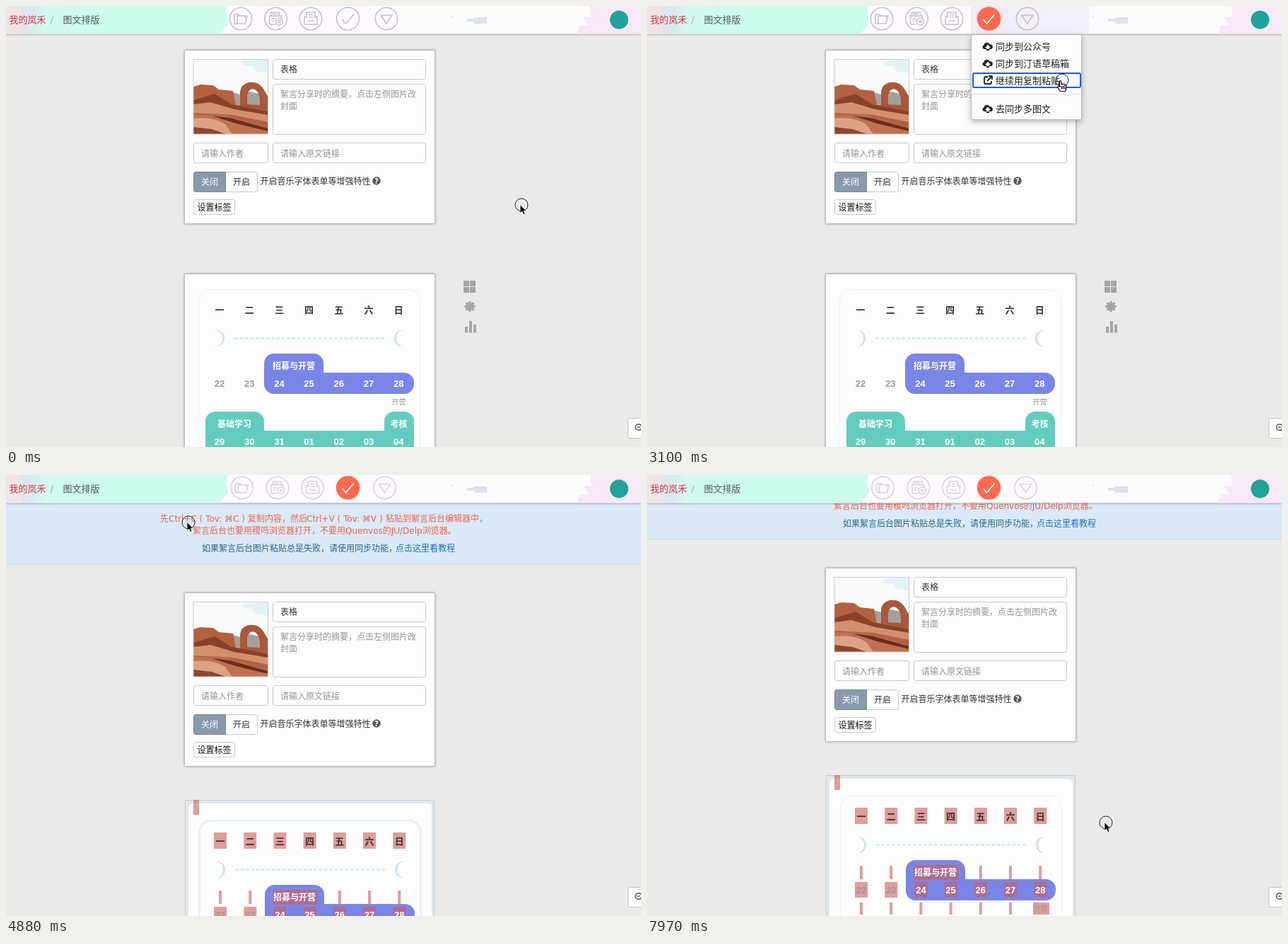
Recreate the animation shown at these times as an HTML page. Size 898 px wide and 623 px high, loop 8 s.

```html
<!DOCTYPE html>
<html lang="zh-CN">
<head>
<meta charset="utf-8">
<title>图文排版</title>
<style>
  html, body { margin: 0; width: 100%; height: 100%; overflow: hidden; background: #ebeae9; }
  svg { display: block; width: 898px; height: 623px; font: 12px "DejaVu Sans", "Noto Sans CJK SC", "Noto Sans CJK", sans-serif; }
  text { white-space: pre; }
  .card { fill: #fdfdfd; stroke: #bdbdbd; filter: drop-shadow(0 0 1.5px #0005); }
  .field { fill: #fdfdfd; stroke: #c9c9c9; }
  .hint { fill: #949494; }
  .menu { font-size: 13px; fill: #222; }
  .num { font: bold 13px "Liberation Sans", Arial, sans-serif; text-anchor: middle; }
  .bold { font-weight: bold; text-anchor: middle; }
  .mark { fill: #cd5f5a; opacity: .6; }
  .line { fill: none; stroke-width: 1.6; stroke-linejoin: round; }
</style>
</head>
<body>
<svg viewBox="0 0 898 623">
  <defs>
    <linearGradient id="top">
      <stop offset="0" stop-color="#f1e4e6"/><stop offset=".065" stop-color="#ece5ea"/>
      <stop offset=".08" stop-color="#dde5ec"/><stop offset=".14" stop-color="#d8eef0"/>
      <stop offset=".17" stop-color="#d6f8ef"/><stop offset=".33" stop-color="#cbfcee"/>
    </linearGradient>
    <clipPath id="crop"><path d="M0 0H106V106H0z"/></clipPath>
    <path id="cloud" d="M-4 4h-1a3 3 0 0 1-.6-5.8A4.6 4.6 0 0 1 3-2.600A3.300 3.300 0 0 1 4 4H2V2h2L0-2.500-4 2h2v4H2V4z"/>
  </defs>

  <g id="cover">
    <rect class="card" x="252.500" y="62.500" width="354" height="245" rx="1.500"/>
    <g transform="translate(265 75)" clip-path="url(#crop)">
      <path fill="#f9fafa" d="M0 0H106V106H0z"/>
      <path fill="#e2f3f7" d="M70 3l36-3V20L88 17 84 10 70 8z"/>
      <path fill="#a5a09c" d="M30 50l16-6 20 6 14-4 26 6V72H30z"/>
      <path fill="#b3613f" d="M0 39l10-3 18 1 8 6 20 2 4 20 46 4v37H0z"/>
      <path fill="#a9583b" fill-rule="evenodd" d="M66 66V46q1-10 12-13 14-2 21 9l7 12V72H66zM76 64V51q3-11 11-8 8 5 7 22z"/>
      <path fill="#8a412c" d="M0 58l30-9 24 15 52 10V81L44 74 0 72z"/>
      <path fill="#d2906f" d="M0 64l24-3 34 10 48 8v10L56 79 0 76z"/>
      <path fill="#c0714f" d="M0 78l46 2 60 17v9H0z"/>
      <path fill="#69301f" d="M26 80l26 3 54 15v4L60 91z"/>
      <path fill="#dda283" d="M0 84q28-3 45 8l10 14H0z"/>
      <path fill="#8d4730" d="M0 96l26 3 20 7H0z"/>
    </g>
    <rect x="265" y="75.500" width="105.500" height="105.500" fill="none" stroke="#ccc"/>
    <g class="field">
      <rect x="377.500" y="75.500" width="216" height="28" rx="3"/>
      <rect x="377.500" y="110.500" width="216" height="71" rx="3"/>
      <rect x="265.500" y="193.500" width="105" height="28" rx="3"/>
      <rect x="377.500" y="193.500" width="216" height="28" rx="3"/>
      <rect x="265.500" y="234.500" width="90" height="28" rx="3"/>
      <rect x="265.500" y="273.500" width="58" height="21" rx="3"/>
    </g>
    <path fill="#8a9aad" stroke="#74869c" d="M268.500 234.500H310.500V262.500H268.500a3 3 0 0 1-3-3V237.500a3 3 0 0 1 3-3z"/>
    <text x="388" y="94" fill="#333">表格</text>
    <g class="hint">
      <text x="388" y="129">絮言分享时的摘要，点击左侧图片改</text>
      <text x="388" y="146">封面</text>
      <text x="276" y="213">请输入作者</text>
      <text x="388" y="213">请输入原文链接</text>
    </g>
    <g fill="#333">
      <text x="276" y="253" fill="#fff">关闭</text>
      <text x="321" y="253">开启</text>
      <text x="359.500" y="252">开启音乐字体表单等增强特性</text>
      <text x="270.500" y="289" fill="#111">设置标签</text>
    </g>
    <circle cx="524" cy="247" r="5.700" fill="#555"/>
    <text x="524" y="250.700" text-anchor="middle" font-size="10" font-weight="bold" fill="#fff">?</text>
  </g>

  <g id="page">
    <rect id="plain" class="card" x="252.500" y="378.500" width="354" height="400" rx="1.500"/>
    <g id="active">
      <path fill="#e1e7ec" stroke="#c6ccd2" d="M253.500 371.500H605.500V700H253.500z"/>
      <rect x="258" y="376" width="344" height="400" rx="6" fill="#fdfdfd"/>
    </g>
    <g id="cal"></g>
    <g id="tools" fill="#a5a5a5">
      <path d="M647 388h8v8h-8zM656 388h8v8h-8zM647 397h8v8h-8zM656 397h8v8h-8z"/>
      <path stroke="#a5a5a5" stroke-width="3.400" d="M656 417v15M648.500 424.500h15M650.700 419.200l10.600 10.600M661.300 419.200l-10.600 10.600"/>
      <path d="M649 453h4v8.500h-4zM655 445h4v16.500h-4zM661 450h4v11.500h-4z"/>
    </g>
  </g>

  <g id="banner">
    <path fill="#d9eaf6" d="M0 30H898V125H0z"/>
    <path stroke="#c6dce8" d="M0 125.500H898"/>
    <g fill="#f4614b">
      <text y="66"><tspan x="218">先Ctrl+C ( Tov: ⌘C )</tspan><tspan x="342">复制内容，然后</tspan><tspan x="425">Ctrl+V ( Tov: ⌘V )</tspan><tspan x="537">粘贴到絮言后台编辑器中，</tspan></text>
      <text x="264" y="83">絮言后台也要用稷鸣浏览器打开，不要用Quenvos的JU/Delp浏览器。</text>
    </g>
    <text x="277" y="108" fill="#26648a">如果絮言后台图片粘贴总是失败，请使用同步功能，</text>
    <text id="link" x="551" y="108">点击这里看教程</text>
  </g>

  <rect x="879.500" y="582.500" width="30" height="28" rx="2" fill="#fdfdfd" stroke="#c4c4c4"/>
  <g class="line" stroke="#555"><circle cx="894.500" cy="595" r="4.300"/><path d="M892.500 595h4M897.500 598l4 4"/></g>

  <g>
    <path fill="#fdfbfd" style="filter:drop-shadow(0 1px 1px #0005)" d="M0 0H898V39.500H0z"/>
    <path fill="url(#top)" d="M0 0H313q-4 12 2 22-4 10-15 17.500H0z"/>
    <path fill="#f8e8f8" d="M826 0H898V39.500H808l3-12h14l-9-12h12z"/>
    <path fill="#dce1f3" d="M652 18h10v-2h18v9h-18v-3h-10zM630 14h2v2h-2z"/>
    <g id="glow"><path fill="#f1effb" d="M507 0H625V39H507z"/><path fill="#f5eaf5" d="M458 0H507V39H458z"/></g>
    <text x="4.500" y="24" font-size="13" fill="#d4373d">我的岚禾</text>
    <text x="62.500" y="24" font-size="13" fill="#aaa">/</text>
    <text x="80.500" y="24" font-size="13" fill="#555">图文排版</text>
    <g id="icons" class="line">
      <g><circle r="15.700"/><path d="M-9 7V-6h6l2 2h7v3M-9 7H6L9-4H-5L-5 7"/></g>
      <g><circle r="15.700"/><path d="M-7-4V-9H5V-4M-9 8V-4H8V0M-9 8H-1M-5-6.500h7M-6 0h5M-6 3h3"/><circle cx="5" cy="4" r="5"/><circle cx="5" cy="4" r="1.600"/></g>
      <g><circle r="15.700"/><path d="M-6-1V-9H6V-1M-6-3h-3V8H9V-3H6M-3-5.500h6M-3-2h6M-5 3H5"/></g>
      <g id="check"><circle r="16"/><path d="M-8 1l5 6L8-6"/></g>
      <g><circle r="15.700"/><path d="M-8-5H8L0 7z"/></g>
    </g>
    <circle cx="867" cy="19.500" r="13" fill="#21a39c"/>
  </g>

  <g id="menu" class="menu">
    <rect x="458.500" y="40.500" width="156" height="120" rx="2" fill="#fdfdfd" stroke="#bbb" style="filter:drop-shadow(0 3px 4px #0004)"/>
    <path stroke="#ddd" d="M459 124.500H614"/>
    <use href="#cloud" x="482" y="57"/><use href="#cloud" x="482" y="81"/><use href="#cloud" x="482" y="145"/>
    <path class="line" stroke="#222" style="stroke-width:1.800" d="M482 100h-3q-2 0-2 2v6q0 2 2 2h6q2 0 2-2v-2M481 106l6-6M483 99h5v5"/>
    <text x="493" y="62">同步到公众号</text>
    <text x="493" y="86">同步到汀语草稿箱</text>
    <text x="493" y="110">继续用复制粘贴</text>
    <text x="493" y="150">去同步多图文</text>
    <rect id="focus" x="461" y="95" width="152" height="20" rx="2" fill="none" stroke="#1b5fcc" stroke-width="2"/>
  </g>

  <g id="cursor">
    <path id="arrow" stroke="#fff" stroke-width=".8" d="M-2-.5V11.500L.8 9l2 4.600 2.200-1L3 8.200H6.500z"/>
    <path id="hand" fill="#fff" stroke="#111" stroke-width="1.200" stroke-linejoin="round" d="M-3.500 9V1.500q1.300-1.800 2.500 0V5.500q1.400-1 2.400.3 1.300-.8 2.300.5 1.500-.5 2.300 1V11L4.500 15.500H-2.500L-6.500 9.500q.8-2 3-.5zM-.5 9v3.500M1.800 9v3.500M4 9v3.500"/>
    <circle r="9" fill="none" stroke="#222"/>
  </g>
</svg>
<script>
const $ = id => document.getElementById(id);
const show = (id, on) => { $(id).style.display = on ? '' : 'none'; };
const move = (el, x, y) => el.setAttribute('transform', `translate(${x} ${y})`);

// Calendar
const cols = [0, 1, 2, 3, 4, 5, 6], colX = i => 302 + 42.2 * i;
const mark = (x, y, w, h) => `<rect x="${x}" y="${y}" width="${w}" height="${h}"/>`;
const bars = (list, y, h) => list.map(i => mark(colX(i) - 2, y, 4, h)).join('');
const boxes = (y, h) => cols.map(i => mark(colX(i) - 9, y, 18, h)).join('');
const label = (x, y, s, fill, cls = 'bold') => `<text class="${cls}" x="${x}" y="${y}" fill="${fill}">${s}</text>`;
const row = (items, y, fill, cls) => items.map((s, i) => label(colX(i), y, s, fill(i), cls)).join('');
$('cal').innerHTML = `
  <rect id="rim" x="272.500" y="400.500" width="313" height="400" rx="16" fill="none"/>
  <path fill="#c5e6f3" d="M296 457.500q13 1 13 12t-13 12q10-3 10-12t-10-12zM562 457.500q-13 1-13 12t13 12q-10-3-10-12t10-12z"/>
  <path stroke="#c5e6f3" stroke-width="2" stroke-dasharray="5 2.400" d="M323 469.500H536"/>
  <path fill="#7a86e7" d="M365 534V505a14 14 0 0 1 14-14H435a14 14 0 0 1 14 14V518H563a14 14 0 0 1 14 14v2a14 14 0 0 1-14 14H379a14 14 0 0 1-14-14z"/>
  <path fill="#62cdbf" d="M282 640V587a14 14 0 0 1 14-14H351a14 14 0 0 1 14 14V600H535V587a14 14 0 0 1 14-14h14a14 14 0 0 1 14 14V640z"/>
  <g id="marks" class="mark">
    ${mark(264, 371, 8, 21) + boxes(417, 23) + boxes(522, 22) + mark(376, 498, 64, 21)}
    ${bars([0, 1, 4, 5, 6], 499, 19) + bars([0, 1, 2, 3, 4, 5], 551, 17) + mark(545, 551, 23, 17)}
  </g>
  <g font-size="13">${row([...'一二三四五六日'], 433.5, () => '#333')}</g>
  ${row(cols.map(i => 22 + i), 538, i => i < 2 ? '#999' : '#fff', 'num')}
  ${row(['29', '30', '31', '01', '02', '03', '04'], 620, () => '#fff', 'num')}
  ${label(407, 513, '招募与开营', '#fff')}
  ${label(323, 595, '基础学习', '#fff')}
  ${label(555.5, 595, '考核', '#fff')}
  <text x="545.500" y="563" font-size="10" fill="#999">开营</text>`;

// Pointer path: [tick, x, y]
const path = [
  [-1, 729, 281], [5, 476, 19], [7, 476, 19], [13, 587, 105], [24, 587, 105],
  [26, 400, 342], [28, 258, 67], [29, 223, 60], [32, 472, 62], [35, 639, 62],
  [38, 570, 81], [39, 570, 81], [41, 762, 390], [42, 745, 461], [45, 745, 461], [49, 649, 491]
];
function pointer(k) {
  const n = path.findIndex(p => p[0] >= k);
  if (n < 1) return path[n ? path.length - 1 : 0].slice(1);
  const [a, x, y] = path[n - 1], [b, x2, y2] = path[n];
  const u = (k - a) / (b - a), e = u * u * (3 - 2 * u);
  return [x + (x2 - x) * e, y + (y2 - y) * e];
}

const idleX = [332, 381.5, 431, 483.5, 538], calmX = [333.5, 384, 433.5, 483.5, 535.5];

function draw(t) {
  // The screen refreshes on a coarse, regular tick
  const k = Math.max(-1, Math.floor((t - 740) / 147.3));
  const open = k >= 5 && k < 18, banner = k >= 18, selected = k >= 19;
  const linked = k >= 18 && k < 25, hand = k >= 5 && k < 25;
  const u = Math.max(0, k - 45) / 4, scroll = Math.round(35 * u * u);

  show('menu', open);
  show('glow', open);
  show('focus', k >= 16);
  show('banner', banner);
  show('marks', selected);
  show('active', selected);
  show('plain', !selected);
  show('tools', !selected);
  show('hand', hand);
  show('arrow', !hand);

  move($('banner'), 0, -scroll);
  move($('cover'), 0, (banner ? 104 : 0) - scroll);
  move($('page'), 0, (selected ? 88 : banner ? 104 : 0) - scroll);
  move($('cal'), selected ? 1 : 0, 0);
  move($('cursor'), ...pointer(k));

  const rim = $('rim');
  rim.setAttribute('stroke', selected ? '#e6f0fa' : '#e3f4f6');
  rim.setAttribute('stroke-width', selected && !scroll ? 3 : 1);
  $('link').setAttribute('fill', linked ? '#1d4a70' : '#1d70b8');
  $('link').setAttribute('text-decoration', linked ? 'underline' : 'none');

  const icons = $('icons');
  icons.setAttribute('stroke', banner ? '#ddd0e0' : '#cbbdca');
  [...icons.children].forEach((g, i) => move(g, (banner ? calmX : idleX)[i], 18));
  const disc = $('check').firstElementChild, lit = k >= 5;
  disc.setAttribute('fill', !lit ? 'none' : k === 5 ? '#fd8770' : '#fd6a50');
  disc.setAttribute('stroke', !lit ? '#cbbdca' : k === 5 ? '#fd8770' : '#fd6a50');
  disc.nextElementSibling.setAttribute('stroke', lit ? '#fff' : '#cbbdca');
}

const start = performance.now();
function frame() {
  draw((performance.now() - start) % 8000);
  requestAnimationFrame(frame);
}
frame();
</script>
</body>
</html>
```
